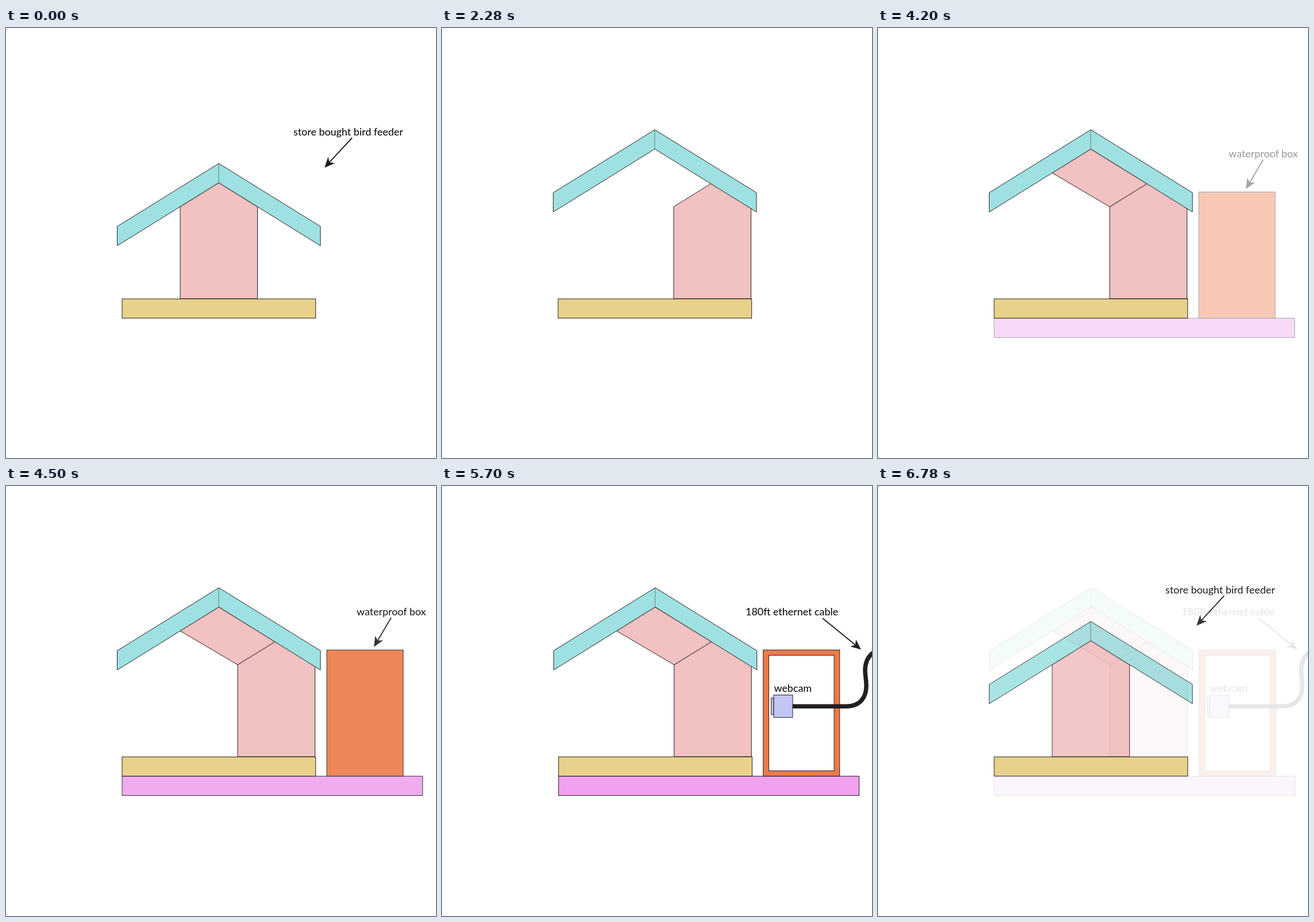
Animation of 748x748 px, one loop 6.84 s. Source, as an HTML page:

```html
<!DOCTYPE html>
<html lang="en">
<head>
<meta charset="utf-8">
<title>Bird feeder build</title>
<style>
  html, body { margin: 0; width: 100%; height: 100%; overflow: hidden; background: #fff; }
  svg { display: block; width: 100%; height: 100%; }
  text { font: 17.9px Lato, "Open Sans", sans-serif; fill: #000; }
  .shape { stroke: #231f20; stroke-width: 1; }
  .seam { stroke: #231f20; stroke-width: 1; opacity: .5; }
  .shaft { stroke: #231f20; stroke-width: 1.9; }
  .head { fill: #231f20; }
  .cable { fill: none; stroke: #231f20; stroke-width: 7.5; }
</style>
</head>
<body>
<svg id="stage" viewBox="0 0 748 748"></svg>
<script>
const HOLD = 600, STEP = 60, STEPS = 10;
const SPAN = HOLD + STEP * (STEPS - 1);

const TEAL = '#9fe1e2', PINK = '#f2c1c1', SAND = '#e8d28b';
const ORANGE = '#ec7a48', PURPLE = '#f0a2ee', LILAC = '#c3c5f3';

const poly = (points, fill) => `<polygon class="shape" points="${points}" fill="${fill}"/>`;
const box = (x1, y1, x2, y2, fill) =>
  `<rect class="shape" x="${x1}" y="${y1}" width="${x2 - x1}" height="${y2 - y1}" fill="${fill}"/>`;
const label = (x, y, words) => `<text x="${x}" y="${y}">${words}</text>`;
const shift = (dx, content) => `<g transform="translate(${dx} 0)">${content}</g>`;

function arrow(x1, y1, x2, y2) {
  const len = Math.hypot(x2 - x1, y2 - y1);
  const ux = (x2 - x1) / len, uy = (y2 - y1) / len;
  const at = (back, side) => [x2 - ux * back - uy * side, y2 - uy * back + ux * side];
  const [ex, ey] = at(12, 0);
  const head = [[x2, y2], at(18, 8), at(13, 0), at(18, -8)].join(' ');
  return `<line class="shaft" x1="${x1}" y1="${y1}" x2="${ex}" y2="${ey}"/>` +
    `<polygon class="head" points="${head}"/>`;
}

// y is the height of the ridge
const roof = y =>
  poly(`193.5,${y + 109.5} 370.2,${y} 547,${y + 109.5} 547,${y + 143} 370.2,${y + 33.5} 193.5,${y + 143}`, TEAL) +
  `<line class="seam" x1="370" y1="${y}" x2="370" y2="${y + 33.5}"/>`;
const house = x =>
  poly(`${x},471 ${x},311 ${x + 67.2},269.2 ${x + 134.5},311 ${x + 134.5},471`, PINK);
const tray = box(202, 471.2, 538.7, 504.7, SAND);
const panel = poly('303,252 370,210.5 468,271 403,311', PINK);
const plank = box(202, 504.8, 724.8, 538.4, PURPLE);
const crate = box(558, 285.2, 691, 504.7, ORANGE);

const raised = roof(177);
const moved = house(403) + raised + tray;
const opened = house(403) + panel + raised + tray;

const webcam =
  box(568.5, 294.5, 682, 495.4, '#fff') +
  '<path class="cable" d="M610 383.3H703C728 383.3 739 367 738 345C738 336 736 330 736 321C736 306 742 295 752 288.5"/>' +
  box(572.6, 368.8, 577, 397.8, LILAC) +
  box(577, 363.6, 610, 402.6, LILAC) +
  label(577.5, 358, 'webcam') +
  label(528, 225, '180ft ethernet cable') +
  arrow(662, 230, 729, 284.5);

const scenes = [
  house(303) + roof(235.7) + tray + label(500, 187, 'store bought bird feeder') + arrow(602, 191, 554, 243),
  house(302) + raised + tray,
  moved,
  opened,
  plank + opened + crate + label(610, 225, 'waterproof box') + arrow(670, 229, 640, 280),
  shift(.75, plank + opened + crate) + webcam
];

const stage = document.getElementById('stage');
stage.innerHTML = scenes
  .map(content => `<g><rect width="748" height="748" fill="#fff"/>${content}</g>`).join('');
const layers = [...stage.children];

function draw(now) {
  const t = now % (SPAN * scenes.length);
  const from = Math.floor(t / SPAN);
  const to = (from + 1) % scenes.length;
  const local = t - from * SPAN;
  const mix = local < HOLD ? 0 : (Math.floor((local - HOLD) / STEP) + 1) / STEPS;
  const low = Math.min(from, to);
  // the lower layer stays solid, the upper one carries the fade
  layers.forEach((layer, i) => {
    let alpha = 0;
    if (i === low) alpha = 1;
    else if (i === to) alpha = mix;
    else if (i === from) alpha = 1 - mix;
    layer.style.opacity = alpha;
  });
}

function tick() {
  draw(performance.now());
  requestAnimationFrame(tick);
}
tick();
</script>
</body>
</html>
```
